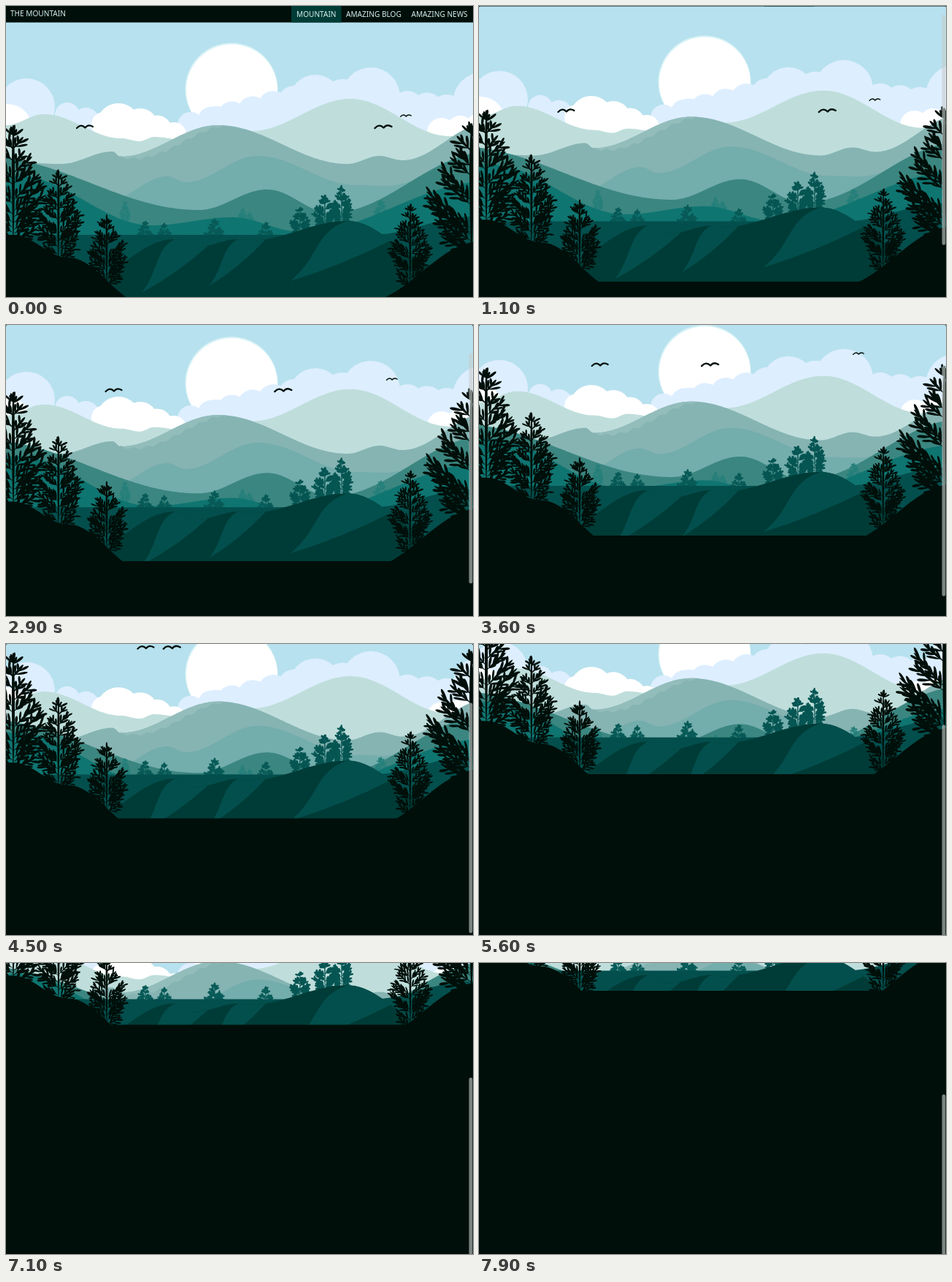
An HTML page with a canvas for the animation above (8 s loop, 640 by 398 pixels).

```html
<!DOCTYPE html>
<html lang="en">
<head>
<meta charset="utf-8">
<title>The Mountain</title>
<style>
  html, body { margin: 0; height: 100%; overflow: hidden; background: #010f0a; }
  canvas { display: block; width: 100vw; height: 100vh; }
</style>
</head>
<body>
<canvas id="stage" width="640" height="398"></canvas>
<script>
const W = 640, H = 398, LOOP = 8000, STEP = 100, FOLD = 399, DEEP = 800, UP = -Math.PI / 2;
const INK = '#010f0a', SHADE = '#003c37', FACE = '#034f4d';
const ctx = document.getElementById('stage').getContext('2d');

// Scroll offset over time: [ms, px]
const SCROLL = [[0, 0], [500, 0], [1400, 33], [1800, 43], [1900, 43], [2200, 49],
  [2800, 71], [3600, 111], [5600, 221], [6300, 268], [7900, 361]];

const lerp = (a, b, u) => a + (b - a) * u;
const swing = u => (1 - Math.cos(Math.PI * u)) / 2;

// Height at x through [x, y] key points, with the given easing between them
function along(keys, x, ease = u => u) {
  const i = Math.max(1, keys.findIndex(k => k[0] >= x));
  const [x0, a] = keys[i - 1], [x1, b] = keys[i];
  return lerp(a, b, ease(Math.max(0, Math.min(1, (x - x0) / (x1 - x0)))));
}

function rng(seed) {
  return () => {
    seed = (seed * 16807) % 2147483647;
    return seed / 2147483647;
  };
}

// A hill line rolls smoothly between its peaks and valleys
const hill = (...keys) => {
  const shape = [[-200, keys[0][1]], ...keys, [900, keys[keys.length - 1][1]]];
  return x => along(shape, x, swing);
};

function trace(path, line, from, to) {
  const dir = Math.sign(to - from);
  for (let x = from; (to - x) * dir >= 0; x += 2 * dir) path.lineTo(x, line(x));
}

function ground(line) {
  const path = new Path2D();
  path.moveTo(-10, DEEP);
  trace(path, line, -10, 650);
  path.lineTo(650, DEEP);
  return path;
}

// Lit face of a hill: from its peak down to a foot, back up to the ridge at `exit`
function litFace(line, px, fx, fy, exit) {
  const path = new Path2D(), py = line(px), dx = fx - px, dy = fy - py;
  path.moveTo(px, py);
  path.bezierCurveTo(px + dx * 0.58, py + dy * 0.18, px + dx * 0.48, py + dy * 0.6, fx, fy);
  path.quadraticCurveTo((fx + exit) / 2 + 5, (fy + line(exit)) / 2 + 5, exit, line(exit));
  trace(path, line, exit, px);
  return path;
}

function puffs(...circles) {
  const path = new Path2D();
  for (const [x, y, r] of circles) {
    path.moveTo(x + r, y);
    path.arc(x, y, r, 0, Math.PI * 2);
  }
  return path;
}

// Row of circles blending from one to another
const chain = (a, b, n) =>
  Array.from({ length: n }, (_, i) => a.map((v, k) => lerp(v, b[k], i / (n - 1))));

// Needle with a narrow base and a blunt tip
function blade(path, x, y, angle, len, thick) {
  const c = Math.cos(angle), s = Math.sin(angle), half = thick * 0.65;
  const at = (f, side) => [x + c * len * f - s * half * side, y + s * len * f + c * half * side];
  path.moveTo(x, y);
  path.bezierCurveTo(...at(0.4, 1), ...at(0.98, 1), ...at(1, 0));
  path.bezierCurveTo(...at(0.98, -1), ...at(0.4, -1), x, y);
}

// Half width of a pine from tip (0) to lowest branch (1)
const spread = u => Math.min(1, 0.22 + 1.45 * u) * (1 - 0.3 * Math.max(0, u - 0.65) / 0.35);

function pine(x, top, bottom, width, seed, needle = width * 0.2, thick = width * 0.043) {
  const path = new Path2D(), rand = rng(seed), h = bottom - top;
  const vary = (a, b) => lerp(a, b, rand());
  const rows = Math.round(h / needle * 1.25);
  blade(path, x, bottom, UP, h - needle * 0.4, width * 0.05);
  blade(path, x, top + needle, UP, needle, thick);
  for (let i = 0; i < rows; i++) {
    const u = i / (rows - 1);
    for (const side of [-1, 1]) {
      const reach = Math.max(1, width / 2 * spread(u) * vary(0.82, 1.08) - needle * 0.45);
      const rise = reach * lerp(1.2, 0.5, u) * vary(0.8, 1.2);
      const tipY = lerp(top + needle * 0.9, bottom - h * 0.1, u) + vary(-0.25, 0.25) * needle;
      const baseY = Math.min(bottom, tipY + rise);
      const angle = Math.atan2(tipY - baseY - 1, side * reach);
      const len = Math.hypot(reach, tipY - baseY);
      blade(path, x, baseY, angle, len + needle * 0.6, thick);
      const count = Math.max(1, Math.round(len / (needle * 0.42)));
      for (let k = 1; k <= count; k++) {
        const f = (k - 0.3) / count;
        for (const turn of [-1, 1]) {
          blade(path, x + side * reach * f, lerp(baseY, tipY, f),
            angle + turn * vary(0.25, 0.75), needle * vary(0.65, 1.05), thick * vary(0.8, 1.1));
        }
      }
    }
  }
  return path;
}

const smallPine = (x, top, bottom, width) =>
  pine(x, top, bottom, width, x * 7, width * 0.24, width * 0.1);

const layers = [];
const add = (rate, color, ...paths) => layers.push({ rate, color, paths });

// Sun and clouds
add(0.455, '#d9f3f6', puffs([309, 114, 63.5]));
add(0.455, '#ffffff', puffs([309.5, 115, 62.5]));
add(0.462, '#ddeeff',
  puffs([28, 138, 39], ...chain([84, 149, 17], [135, 166, 20], 3), [288, 167, 30],
    ...chain([253, 163, 18], [395, 132, 23], 6), [424, 130, 36], [462, 132, 32], [500, 124, 40],
    ...chain([550, 138, 22], [604, 144, 23], 3), [655, 133, 43]),
  ground(hill([60, 152], [200, 168], [470, 125], [600, 146])));
add(0.46, '#ffffff',
  puffs([2, 168, 34], [134, 162, 17], [154, 163, 30], ...chain([184, 164, 24], [230, 176, 17], 3),
    ...chain([597, 173, 20], [648, 165, 18], 3)));

// Far ranges
const range = hill([0, 163], [52, 148], [158, 181], [183, 185], [203, 179], [260, 186],
  [336, 171], [472, 127], [608, 178]);
const second = hill([0, 213], [75, 216], [146, 199], [157, 206], [291, 163], [468, 216],
  [512, 205], [543, 211], [660, 160]);
const haze = x => second(x) + 11 * Math.sin(Math.PI * (x - 156) / 143) + 1.5 * Math.sin(x * 0.35);
const veil = new Path2D();
trace(veil, second, 156, 299);
trace(veil, haze, 299, 156);
add(0.517, '#bfdedb', ground(range));
add(0.526, '#86b4b3', ground(second));
add(0.526, '#93bdbb', veil);
add(0.58, '#73adac', ground(hill([140, 266], [221, 233], [246, 241], [345, 205], [480, 245], [520, 246], [670, 195])));

// Middle hills with distant trees
add(0.64, '#3b8680', ground(hill([-30, 206], [264, 279], [358, 251], [445, 283], [660, 200])));
add(0.69, '#257f7a', smallPine(163, 267, 298, 14), smallPine(324, 277, 297, 11),
  smallPine(334, 282, 298, 10), smallPine(514, 265, 292, 19));
add(0.69, '#0f7571', ground(hill([15, 232], [200, 300], [310, 289], [405, 309], [660, 240])));

// Near hills
const near = hill([90, 385], [230, 319], [260, 330], [318, 319], [332, 321], [468, 294], [600, 358]);
add(0.838, '#075a57', smallPine(191, 294, 338, 26), smallPine(217, 296, 330, 20),
  smallPine(286, 290, 334, 28), smallPine(356, 295, 332, 23));
add(0.838, '#055553', smallPine(403, 275, 316, 27), smallPine(437, 258, 305, 30), smallPine(460, 247, 300, 30));
add(0.838, FACE, ground(hill([500, 313], [640, 288])));
add(0.838, SHADE, ground(near));
add(0.838, FACE, litFace(near, 231, 186, 392, 277), litFace(near, 318, 278, 383, 356),
  litFace(near, 468, 390, 376, 527));

// Foreground
add(0.94, INK,
  ground(hill([10, 313], [85, 344], [195, 410])), ground(hill([490, 405], [650, 322])),
  pine(10, 163, 328, 84, 101), pine(72, 224, 352, 64, 113), pine(138, 285, 384, 58, 127),
  pine(554, 272, 384, 56, 139), pine(638, 160, 344, 116, 151, 20, 3.8));

// Birds: start x, y, sideways drift per scrolled pixel, scale
const BIRDS = [[108, 165, 0.52, 1], [517, 165, -1.805, 1.05], [548, 150, -0.252, 0.66]];
const wings = new Path2D('M-11 2Q-5 -4.500 0.500 1.500Q4.500 -4 11 0');

function drawBirds(s) {
  ctx.strokeStyle = '#03100d';
  ctx.lineWidth = 2.2;
  ctx.lineCap = ctx.lineJoin = 'round';
  for (const [x, y, drift, scale] of BIRDS) {
    ctx.save();
    ctx.translate(x + drift * s, y - s);
    ctx.scale(scale, scale);
    ctx.stroke(wings);
    ctx.restore();
  }
}

function drawHeader(s) {
  ctx.save();
  ctx.translate(0, -s);
  ctx.fillStyle = INK;
  ctx.fillRect(0, 0, W, 22.5);
  ctx.fillStyle = '#003c36';
  ctx.fillRect(391, 0, 68.5, 22.5);
  ctx.fillStyle = '#d6eeee';
  ctx.font = '500 10.1px "Noto Sans", "Open Sans", sans-serif';
  ctx.fillText('THE MOUNTAIN', 6, 14);
  ctx.fillText('MOUNTAIN', 398, 14.5);
  ctx.fillText('AMAZING BLOG', 466, 14.5);
  ctx.fillText('AMAZING NEWS', 555.5, 14.5);
  ctx.restore();
}

function drawScrollbar(s) {
  if (s <= 0) return;
  ctx.fillStyle = 'rgba(200, 206, 204, 0.62)';
  ctx.beginPath();
  ctx.roundRect(634.5, 1 + 0.495 * s, 4.8, 315, 2.4);
  ctx.fill();
}

function drawCorners() {
  ctx.fillStyle = INK;
  for (const [x, dir] of [[0, 1], [W, -1]]) {
    ctx.beginPath();
    ctx.moveTo(x, 0);
    ctx.lineTo(x + dir * 2, 0);
    ctx.quadraticCurveTo(x, 0, x, 2);
    ctx.fill();
  }
}

function draw(t) {
  const s = along(SCROLL, t);
  ctx.fillStyle = '#b7e1ee';
  ctx.fillRect(0, 0, W, H);
  for (const { rate, color, paths } of layers) {
    ctx.save();
    ctx.translate(0, -rate * s);
    ctx.fillStyle = color;
    for (const path of paths) ctx.fill(path);
    ctx.restore();
  }
  drawBirds(s);
  ctx.fillStyle = INK;
  ctx.fillRect(0, FOLD - s, W, H);
  drawHeader(s);
  drawScrollbar(s);
  drawCorners();
}

const start = performance.now();
function tick() {
  const t = (performance.now() - start) % LOOP;
  draw(Math.floor(t / STEP) * STEP);
  requestAnimationFrame(tick);
}
tick();
</script>
</body>
</html>
```
